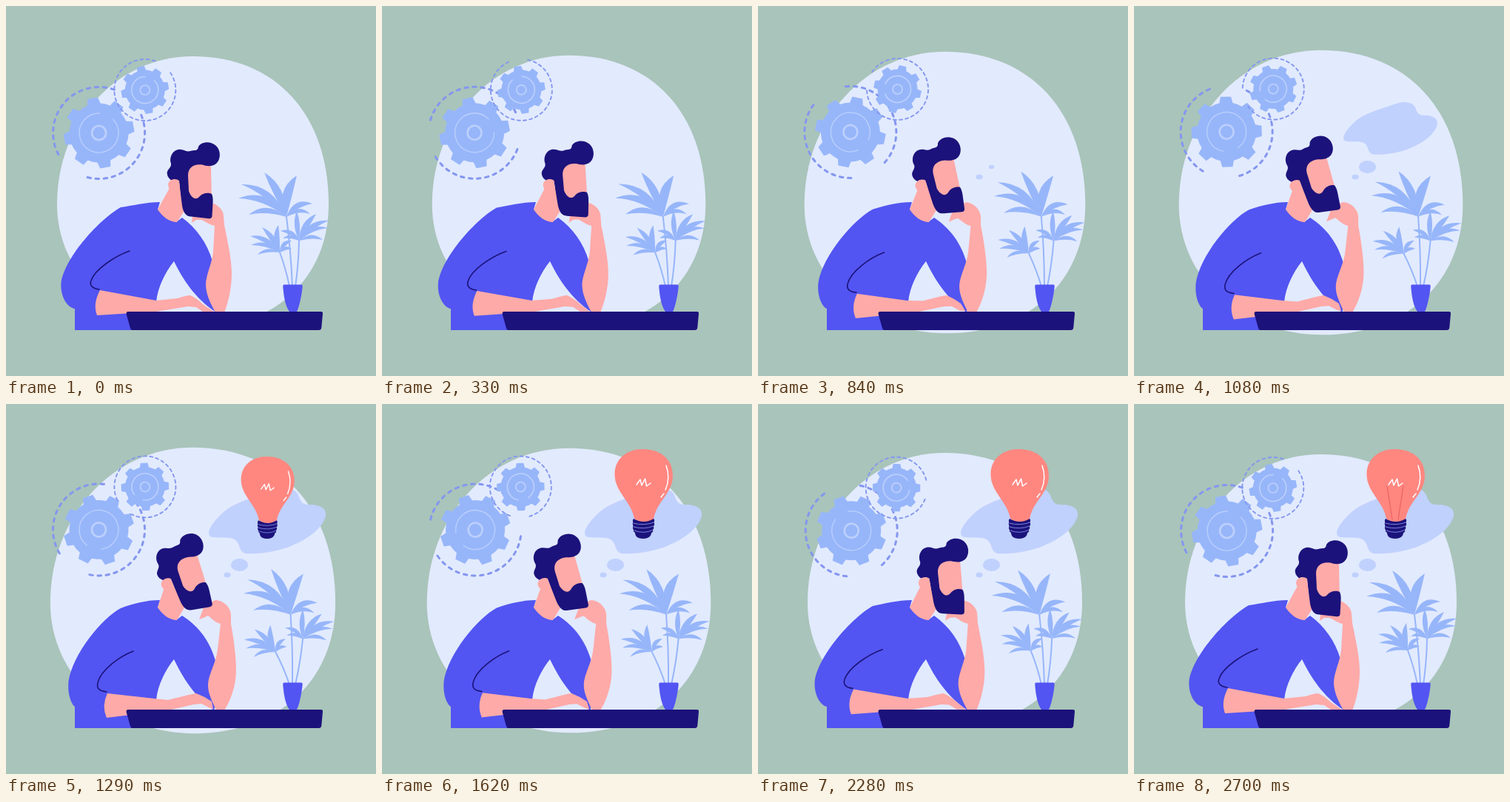
These frames come from a looping animation (500x500 px, 2760 ms). An HTML page:

```html
<!DOCTYPE html>
<html lang="en">
<head>
<meta charset="utf-8">
<title>Thinking</title>
<style>
  html, body { margin: 0; width: 100%; height: 100%; overflow: hidden; background: #a9c4ba; }
  svg { display: block; width: 100%; height: 100%; }
  .line { fill: none; stroke-linecap: round; stroke-linejoin: round; }
  .skin { fill: #feaaa8; }
  .blue { fill: #5255f1; }
  .navy { fill: #1c127b; }
  .leaf { fill: #97b6fa; }
  .stem { stroke: #97b6fa; stroke-width: 2; }
  .cloud { fill: #c0d1fd; }
  .ring { stroke: #8497ef; }
  .mark { stroke: #bdd0fc; }
</style>
</head>
<body>
<svg viewBox="0 0 500 500">
  <rect width="500" height="500" fill="#a9c4ba"/>
  <path id="blob" fill="#e2eafe"
    d="M252.500 68C364 68 436 146 436 268C436 368 362 436 255 436C150 436 69 363 69 268C69 157 149 68 252.500 68Z"/>

  <g id="gears"></g>

  <ellipse id="dotA" class="cloud" cx="299" cy="231" rx="4.800" ry="3.600"/>
  <ellipse id="dotB" class="cloud" cx="315.500" cy="217.500" rx="11.500" ry="8.500"/>
  <path id="cloud" class="cloud"
    d="M275 178C271 171 281 158 294 146C309 133 332 127 353 120C372 111 390 112 395 123C399 135 402 136 412 136C424 136 433 141 432 150C430 166 409 183 380 194C358 201 338 203 324 202C314 200 317 188 309 183C300 178 280 183 275 178Z"/>

  <g id="bulb">
    <path fill="#ff8780"
      d="M314.500 96C314 74 331 61 352 61C377 61 393 75 393 97C393 121 371 131 367 156Q354 164 341 155C337 132 315 119 314.500 96Z"/>
    <path id="wires" class="line" stroke="#ea6263" stroke-width="1.200" d="M342 111L349 156M364 110L357 156"/>
    <path class="line" stroke="#fff" stroke-width="1.500"
      d="M344 109L349 102L351 110L355.500 101L357.500 111L363 107M384 83Q390 100 383 116M381 121L377 126"/>
    <path class="navy"
      d="M340 155Q354 163 367 155Q369 157 367.500 160Q369 163 367 165Q368 168 366 170Q367 173 364 174C364 179 359 182 353 182C346 182 342 179 342 174Q339 172 340 170Q338 168 339.500 165Q338 162 339 160Q338 157 340 155Z"/>
    <path class="line" stroke="#8fa2f2" stroke-width=".8"
      d="M339.500 161Q354 165 367.500 160M340 166Q354 170 367 165M341 171Q354 176 365.500 170.500"/>
  </g>

  <g id="plant"></g>
  <path class="blue"
    d="M376 376.500H399Q401 376.500 400.700 379.500C399 395 396 407 393 413H383C378 406 375.500 395 374.300 379.500Q374 376.500 376 376.500Z"/>

  <path id="torso" class="blue"/>
  <path id="sleeve" class="line" stroke="#1c127b" stroke-width="1.600"/>
  <path id="forearm" class="skin"/>
  <path id="arm" class="skin"/>
  <path id="neck" class="skin"/>
  <g id="head">
    <path class="skin" d="M244 213H274Q277 214 277 218L278 264H244Z"/>
    <path class="navy"
      d="M234 238C228 240 219 234 218 228C216 221 224 219 223 213C220 205 225 195 233 194C240 193 243 198 249 196C255 194 259 197 260 190C264 183 277 182 284 189C291 196 290 208 284 213C278 218 270 216 265 214.500C253 213 246 219 246 229L247 250C250 259 256 263 261 258C266 252 274 252 278 254Q280 258 279.500 266L278.500 284Q278 287.500 274 287.300L250 284.500C243 284 240 280 238 270Z"/>
    <path class="skin" d="M234 236C229 232 220 234 219 241C219 247 223 251 228 252L236 258Z"/>
  </g>

  <path class="navy"
    d="M165 413H425.500Q428.500 413 428 416L426.300 434.500Q426 438 422.500 438H171Q168.700 438 168 435.500L162.700 416.500Q162 413 165 413Z"/>
</svg>

<script>
const STEP = 30, END = 2700, LOOP = 2760;
const $ = id => document.getElementById(id);
const rad = a => a * Math.PI / 180;
const polar = (r, a) => `${(r * Math.cos(rad(a))).toFixed(2)} ${(r * Math.sin(rad(a))).toFixed(2)}`;
const clamp = x => Math.min(1, Math.max(0, x));

const arc = (r, from, to) =>
  `M${polar(r, from)}A${r} ${r} 0 ${to - from > 180 ? 1 : 0} 1 ${polar(r, to)}`;

function cog(tip, root, first) {
  const pts = [];
  for (let i = 0; i < 8; i++) {
    const a = first + i * 45;
    pts.push(polar(root, a - 13), polar(tip, a - 9), polar(tip, a + 8), polar(root, a + 13), polar(root, a + 22));
  }
  return `M${pts.join('L')}Z`;
}

const line = (cls, d, width, dash = 'none') =>
  `<path class="line ${cls}" d="${d}" stroke-width="${width}" stroke-dasharray="${dash}"/>`;

// The axle sits slightly off centre, so each gear wobbles as it turns.
function gear(x, y, ring, body, arcR, arcWidth, hubR, hubWidth) {
  return `<g transform="translate(${x} ${y})"><g class="spin"><g transform="translate(0 .8)">${ring}
    <path class="leaf" d="${body}"/>
    ${line('mark', arc(arcR, -44, 271), arcWidth)}
    <circle class="line mark" r="${hubR}" stroke-width="${hubWidth}"/></g></g></g>`;
}

$('gears').innerHTML =
  gear(125.6, 170.7,
    line('ring', arc(62, 152, 291) + arc(62, 337, 469), 3, '4.5 6.6'),
    cog(48, 40, -100), 26.5, 1.3, 9.5, 2.6) +
  gear(187.8, 112.7,
    line('ring', arc(41.5, -34, 292), 1.9, '4 4.2'),
    cog(32.5, 27, -100), 18, 1.6, 6.5, 1.7);
const [bigGear, smallGear] = document.querySelectorAll('.spin');

// A leaf runs from (x, y) to its tip; bend bows it sideways, fat sets its width.
function leaf(x, y, [tx, ty, bend, fat]) {
  const dx = tx - x, dy = ty - y, len = Math.hypot(dx, dy);
  const ctrl = k => `${x + dx * .55 - dy / len * k} ${y + dy * .55 + dx / len * k}`;
  return `<path class="leaf" d="M${x} ${y}Q${ctrl(bend + fat / 2)} ${tx} ${ty}Q${ctrl(bend - fat / 2)} ${x} ${y}Z"/>`;
}

const twigs = [
  { at: [379, 285], foot: [387, 379], sway: 3.4, leaves: [
    [349, 225, 8, 22], [393, 229, -12, 25], [318, 241, 17, 18], [314, 260, 20, 18],
    [328, 282, 14, 15], [414, 267, -13, 15], [411, 281, -12, 11]] },
  { at: [396, 317], foot: [391, 379], sway: 4.7, leaves: [
    [393, 277, -2, 14], [419, 281, -6, 16], [436, 290, -11, 14], [435, 300, -12, 11],
    [428, 316, -9, 10], [371, 304, 8, 11], [374, 314, 7, 9]] },
  { at: [370, 333], foot: [383, 379], sway: -7.5, leaves: [
    [346, 299, 5, 14], [368, 296, -6, 15], [330, 311, 10, 13], [331, 323, 10, 11],
    [340, 336, 8, 9], [386, 317, -7, 11], [386, 328, -6, 9]] }
];
$('plant').innerHTML = twigs.map(({ at: [x, y], foot: [fx, fy], leaves }) =>
  `<g><path class="line stem" d="M${x} ${y}Q${(x + fx) / 2 + 2} ${(y + fy) / 2} ${fx} ${fy}"/>` +
  leaves.map(l => leaf(x, y, l)).join('') + '</g>').join('');
const stalks = [...$('plant').children];

// Each part has a leaning pose and an upright pose.
const poses = {
  torso: [
    'M208 265C190 265 170 270 155 272C128 287 80 338 74.5 374C73 394 84 408 93 409L93 438L205 438L203 400C205 380 215 360 227 345C238 368 256 396 284 414L290 380L279 345C272 320 257 300 238 286L230 292L205 275Z',
    'M208 265C190 265 170 270 155 276C130 289 90 338 84.5 375C83 394 89 406 93 409L93 438L205 438L203 400C205 380 215 360 227 345C238 368 254 395 281 414L290 380L284 350C276 320 260 300 238 286L230 292L205 275Z'],
  sleeve: [
    'M167 331C147 338 120 356 115 371C112 379 119 382 126 383',
    'M172 334C154 341 128 359 124 377C122 386 128 388 136 389'],
  forearm: [
    'M127 384L203 398L232 395Q244 391 249 391Q258 395 266 403L281 413L266 413L257 407L246 406L203 413L123 418Q117 403 127 384Z',
    'M137 391L200 398L219 400Q250 392 257 391Q268 395 278 402L280 412L276 411L264 405L254 406L219 414L136 424Q129 408 137 391Z'],
  arm: [
    'M278 266C286 268 294 276 294 284L295 296C299 316 305 342 305 362C305 382 300 402 295 414L283 414C275 400 270 388 270 376C270 364 279 346 280 332L282 297C275 296 270 291 264 289L257 289L251 293L252 285L262 270Z',
    'M283 265C293 265 303 274 304 284L304 297C308 318 311 342 311 360C311 380 304 400 295 414L284 414C279 402 273 392 273 380C273 366 284 350 286 332L290 297C284 296 279 291 273 286L269 288L261 291L265 281L268 272Z'],
  neck: [
    'M221 246L205 275C211 284 220 292 231 292L243 274L240 245Z',
    'M214 248L205 275C211 284 220 292 231 292L243 272L234 245Z']
};

function mix([a, b], p) {
  const goal = b.match(/[\d.]+/g);
  let i = 0;
  return a.replace(/[\d.]+/g, n => (+n + (goal[i++] - n) * p).toFixed(2));
}

const turn = (el, a, x = 0, y = 0) => el.setAttribute('transform', `rotate(${a} ${x} ${y})`);

function scale(el, k, x, y) {
  el.setAttribute('visibility', k > 0 ? 'visible' : 'hidden');
  el.setAttribute('transform', `translate(${x} ${y}) scale(${k}) translate(${-x} ${-y})`);
}

const grow = (t, from, span) => 1 - (1 - clamp((t - from) / span)) ** 2;

function draw(t) {
  const p = (1 - Math.cos(2 * Math.PI * t / END)) / 2;
  const spin = 360 * t / END;

  scale($('blob'), 1 + .05 * p, 252.5, 252);
  turn(bigGear, spin);
  turn(smallGear, -spin);

  scale($('dotA'), grow(t, 600, 240), 299, 231);
  scale($('dotB'), grow(t, 795, 260), 315.5, 217.5);
  scale($('cloud'), grow(t, 930, 270), 320, 195);
  scale($('bulb'), grow(t, 1090, 280), 353, 182);
  $('wires').setAttribute('opacity',
    t < 1590 ? 0 : .5 + .5 * Math.cos(2 * Math.PI * (t - 1950) / 720));

  stalks.forEach((el, i) => turn(el, twigs[i].sway * p, ...twigs[i].foot));
  for (const id in poses) $(id).setAttribute('d', mix(poses[id], p));
  turn($('head'), -16 * p, 228, 276);
}

const start = performance.now();
function tick() {
  const t = Math.max(0, performance.now() - start) % LOOP;
  draw(Math.min(END, Math.floor(t / STEP) * STEP));
  requestAnimationFrame(tick);
}
tick();
</script>
</body>
</html>
```
